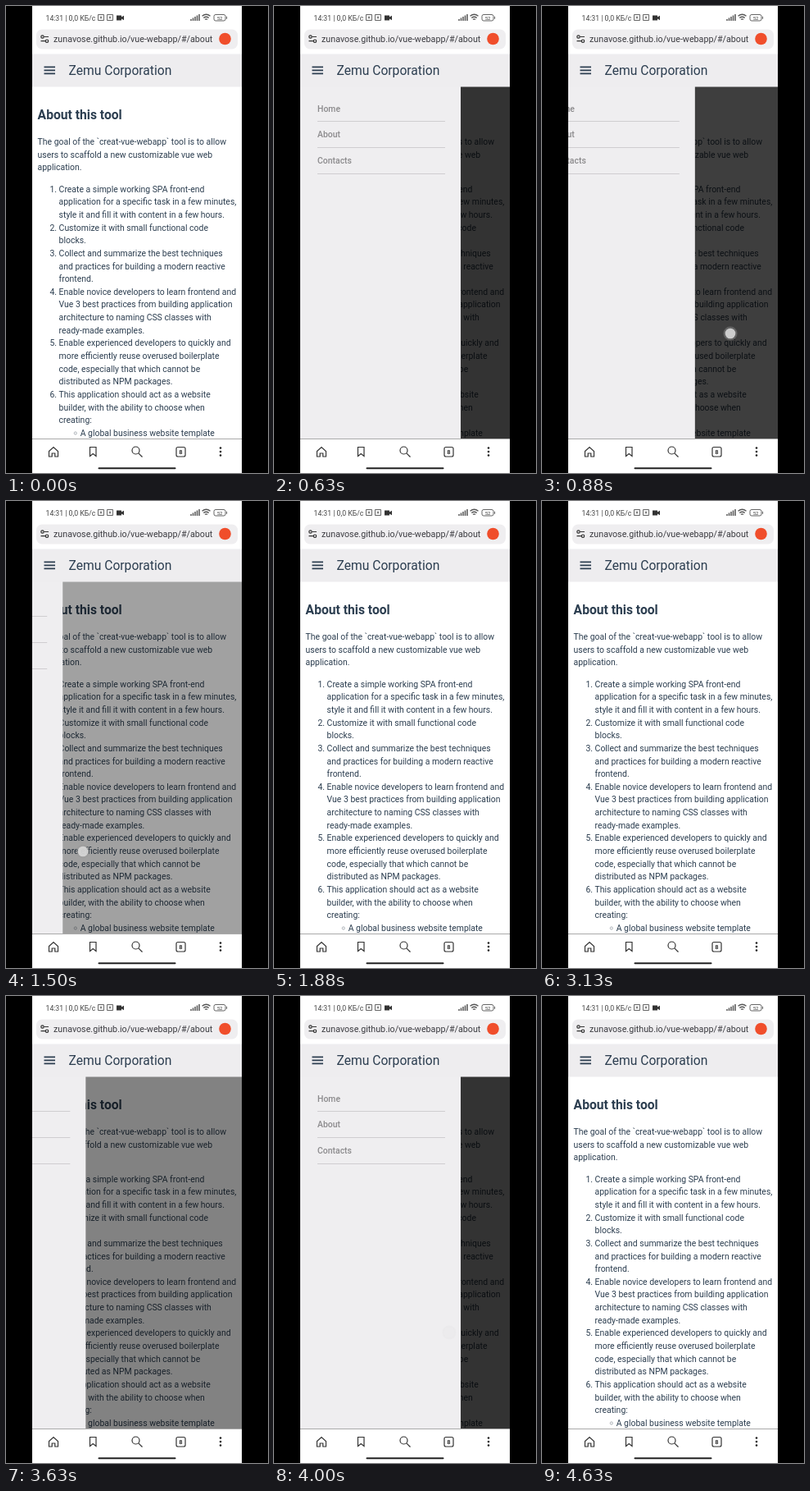
An HTML page that plays this animation: 320x569 px, repeating every 4760 ms.

```html
<!DOCTYPE html>
<html lang="en">
<head>
<meta charset="utf-8">
<style>
html, body { margin: 0; width: 100%; height: 100%; overflow: hidden; background: #000; }
svg { display: block; width: 100%; height: 100%; }
text { font-family: Roboto, Arial, sans-serif; font-size: 10.43px; fill: #2c3e50; white-space: pre; }
.line { fill: none; stroke: #333; stroke-width: 1.2; }
.menu text { font-weight: 500; fill: #8b8a8c; }
</style>
</head>
<body>
<svg viewBox="0 0 320 569">
  <defs><clipPath id="phone"><rect x="32" width="256" height="569"/></clipPath></defs>
  <g clip-path="url(#phone)">
    <rect x="32" width="256" height="569" fill="#fff"/>
    <g id="page">
      <text x="38.6" y="138" style="font-size:15.65px;font-weight:700">About this tool</text>
      <circle cx="84.8" cy="520.5" r="1.6" fill="none" stroke="#8b939b" stroke-width=".7"/>
    </g>
    <rect id="shade" x="32" y="98" width="256" height="430"/>
    <g id="drawer" class="menu">
      <rect x="32" y="98" width="196" height="430" fill="#efeef0"/>
    </g>

    <!-- page header -->
    <rect x="32" y="58.5" width="256" height="40" fill="#eeedef"/>
    <path d="M46.5 74.3h13.5M46.5 78.3h13.5M46.5 82.3h13.5" stroke="#2c3e50" stroke-width="1.8"/>
    <text x="76.5" y="83.6" style="font-size:15.65px">Zemu Corporation</text>

    <!-- status bar -->
    <text x="48.5" y="17.6" style="font-size:8.7px;fill:#444">14:31 | 0,0 КБ/с</text>
    <g class="line" style="stroke:#555;stroke-width:.9">
      <path d="M112.5 10.5h7v7h-7zM123.500 10.5h7v7h-7zM116 12.500v3M114.500 14h3M127 12.500v3M125.500 14h3"/>
      <path d="M226 18v-2M228.500 18v-3.500M231 18v-5M233.500 18v-6.500M236 18v-8" stroke-width="1.5"/>
      <path d="M239.500 12.300q5-4 10 0M241.300 14.500q3.200-2.600 6.400 0M243 16.500q1.500-1.200 3 0" stroke-width="1.4"/>
      <rect x="254" y="10.500" width="14" height="7.500" rx="2"/>
      <path d="M269.600 12.800v3"/>
    </g>
    <path d="M135 11.500h6v2l3-1.700v5.400l-3-1.700v2h-6z" fill="#333"/>
    <text x="261" y="16.600" text-anchor="middle" style="font-size:6px;fill:#444">52</text>

    <!-- address bar -->
    <rect x="37" y="28.500" width="246" height="24" rx="7" fill="#efeef0"/>
    <g class="line"><circle cx="44.500" cy="37.500" r="1.700"/><circle cx="50" cy="42.700" r="1.700"/><path d="M46.500 37.500h5.500M42.500 42.700h5.500"/></g>
    <text x="58" y="44" style="font-size:10.73px;fill:#3b3b40">zunavose.github.io/vue-webapp/#/about</text>
    <circle cx="267.500" cy="40" r="7.300" fill="#f04e2b"/>

    <!-- navigation bar -->
    <rect x="32" y="527" width="256" height="42" fill="#fff"/>
    <path d="M32 527.500h256" stroke="#aaa"/>
    <g class="line">
      <path d="M52.500 542.500l5.500-5 5.500 5v6.500h-3.700v-4h-3.600v4h-3.700zM102.500 537.500h7.500v11l-3.750-3-3.750 3z"/>
      <circle cx="158.500" cy="541.500" r="4.500"/><path d="M161.800 544.800l4.700 4.700"/>
      <rect x="208" y="537.500" width="11" height="11.500" rx="2"/>
    </g>
    <text x="213.500" y="546" text-anchor="middle" style="font-size:7.500px;font-weight:700;fill:#333">8</text>
    <g fill="#222"><circle cx="262" cy="538.500" r="1.300"/><circle cx="262" cy="543" r="1.300"/><circle cx="262" cy="547.500" r="1.300"/></g>
    <path d="M113.500 563.300h93" stroke="#222" stroke-width="2" stroke-linecap="round"/>

    <g id="touch">
      <circle r="8.500" fill="#999" opacity=".4"/>
      <circle r="6.300" fill="#d8d8d8" opacity=".9"/>
    </g>
  </g>
</svg>
<script>
const $ = id => document.getElementById(id);
const STEP = 15.64, LOOP = 4760, FRAME = 125;

function add(parent, tag, attrs, label = "") {
  const el = document.createElementNS("http://www.w3.org/2000/svg", tag);
  for (const name in attrs) el.setAttribute(name, attrs[name]);
  el.textContent = label;
  parent.append(el);
}

[
  "The goal of the `creat-vue-webapp` tool is to allow",
  "users to scaffold a new customizable vue web",
  "application."
].forEach((s, i) => add($("page"), "text", { x: 38.6, y: 169 + i * STEP }, s));

const items = [
  ["Create a simple working SPA front-end", "application for a specific task in a few minutes,", "style it and fill it with content in a few hours."],
  ["Customize it with small functional code", "blocks."],
  ["Collect and summarize the best techniques", "and practices for building a modern reactive", "frontend."],
  ["Enable novice developers to learn frontend and", "Vue 3 best practices from building application", "architecture to naming CSS classes with", "ready-made examples."],
  ["Enable experienced developers to quickly and", "more efficiently reuse overused boilerplate", "code, especially that which cannot be", "distributed as NPM packages."],
  ["This application should act as a website", "builder, with the ability to choose when", "creating:"]
];
let y = 226.7;
items.forEach((lines, i) => {
  add($("page"), "text", { x: 62, y, "text-anchor": "end" }, i + 1 + ".");
  for (const s of lines) {
    add($("page"), "text", { x: 64.6, y }, s);
    y += STEP;
  }
});
add($("page"), "text", { x: 90.7, y }, "A global business website template");

["Home", "About", "Contacts"].forEach((s, i) => {
  add($("drawer"), "text", { x: 53, y: 128.5 + i * 31.8 }, s);
  add($("drawer"), "path", { d: `M53 ${140.5 + i * 32}h156`, stroke: "#cfcdd0" });
});

// [time, share of the drawer that is open]
const openKeys = [[0, 0], [125, 0], [500, 1], [750, 1], [875, .79], [1500, .19], [1625, 0],
  [1875, 0], [2125, 1], [2625, 1], [3000, 0], [3500, 0], [3875, 1], [4000, 1], [4375, 0], [LOOP, 0]];

function at(keys, t) {
  const i = Math.max(1, keys.findIndex(k => k[0] >= t));
  const [t0, a] = keys[i - 1], [t1, b] = keys[i];
  return a + (b - a) * (t - t0) / (t1 - t0);
}

function draw(now) {
  const t = Math.min(37, Math.floor((now % LOOP + 1) / FRAME)) * FRAME;
  const open = at(openKeys, t);
  $("drawer").setAttribute("transform", `translate(${(open - 1) * 196})`);
  $("shade").setAttribute("opacity", Math.min(.8, .85 * Math.sqrt(open)));

  const first = t >= 750 && t <= 1500, last = t >= 4000 && t < 4375;
  const u = (t - 875) / 625, v = (t - 4000) / 375;
  const [x, ty] = first ? [230 - 136 * u, 399 + 28 * u] : [214 - 150 * v, 410 + 16 * v];
  $("touch").setAttribute("transform", `translate(${x} ${ty})`);
  $("touch").setAttribute("opacity", first ? 1 : last ? Math.min(1, .12 + 2 * v) : 0);
  requestAnimationFrame(draw);
}
const start = performance.now();
(function tick() { draw0(); })();
function draw0() {
  const loop = () => { paint(performance.now() - start); };
  loop();
}
function paint(now) { draw(now); }
</script>
</body>
</html>
```
